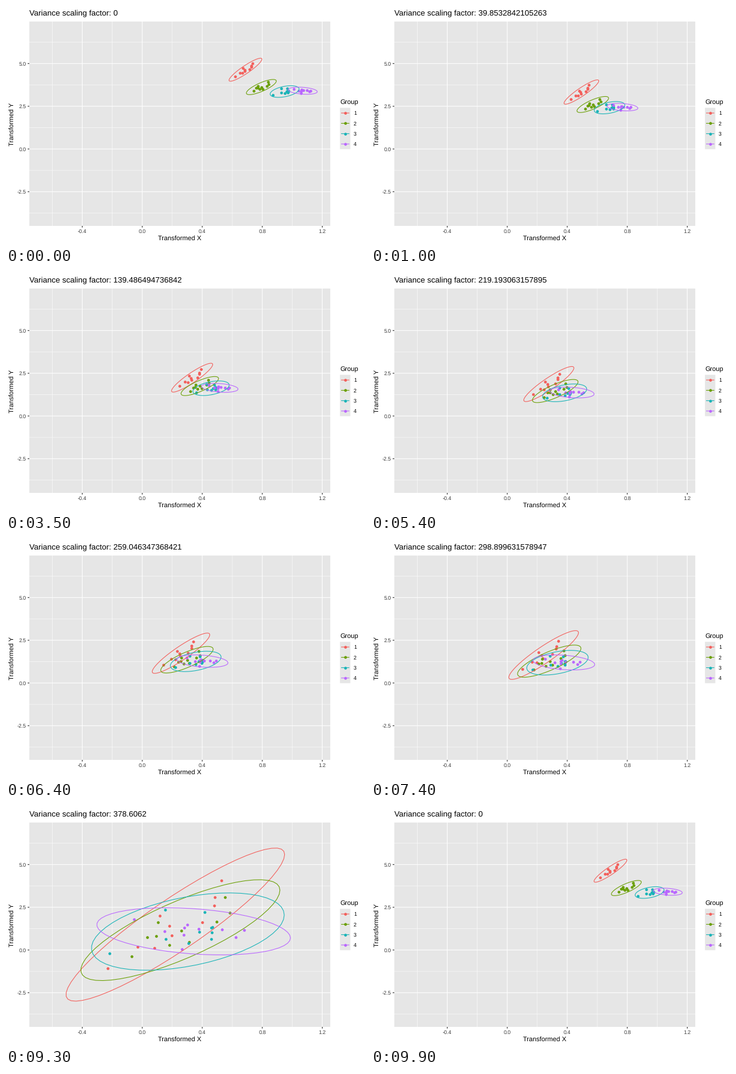
Recreate the animation shown at these times as a matplotlib script. Size 600x400 px, loop 10 s.

```python
import numpy as np
import matplotlib.pyplot as plt
from matplotlib.animation import FuncAnimation
from matplotlib.patches import Rectangle

plt.rcParams["font.family"] = "Liberation Sans"
plt.rcParams["text.hinting"] = "none"
plt.rcParams["path.snap"] = False

PX = 0.72  # points per pixel at 100 dpi
W, H, FRAMES = 600, 400, 100
LEFT, RIGHT, TOP, BOTTOM = 39, 542, 26, 368
ORIGIN = np.array([227.7, 239.3])
X_UNIT, Y_UNIT = 250.7, 28.6
COLORS = ["#F35E5A", "#6A9F04", "#17B3B7", "#B966FF"]
PANEL, LABEL, TICK = "#E6E6E6", "#3C3C3C", "#262626"

STATES = 20
STEP = 378.6062 / 19
LIMIT = 384.55
REF = 17 * STEP  # factor at which the clouds below are given

CLOUDS = [
    [(236, 227), (258, 211), (270, 212), (274, 188.5), (281, 196),
     (282.5, 203), (305, 193.5), (313.5, 181), (314, 175), (319, 163)],
    [(258.5, 224), (270, 210), (276.5, 209), (278, 199), (286, 215.5),
     (295, 205), (300.5, 213.5), (320.5, 198.5), (326.5, 180.5), (330, 192)],
    [(250, 223), (290.5, 191.5), (291, 212.5), (307.5, 215.5), (315.5, 207.5),
     (319.5, 193), (324, 212.5), (325, 204), (324.5, 208), (324, 204.5)],
    [(274, 198), (296, 206.5), (308.5, 220), (310, 209.5), (312.5, 202),
     (310.5, 204), (321, 205), (338, 205.5), (348, 211), (354, 206)],
]


def shrink(s):
    """Pull of the group centres towards the origin."""
    return 1 / np.sqrt(1 + 0.02353 * s)


def spread(s):
    """Growth of each cloud around its centre."""
    return 1 / np.sqrt(1 - s / LIMIT)


def ellipse(dev):
    """95% t-ellipse around centred points."""
    a = np.arange(52) * 2 * np.pi / 51
    chol = np.linalg.cholesky(np.cov(dev.T))
    return 2.918 * np.column_stack([np.cos(a), np.sin(a)]) @ chol.T


groups = []
for cloud in np.array(CLOUDS):
    mean = cloud.mean(axis=0)
    dev = (cloud - mean) / spread(REF)
    groups.append(((mean - ORIGIN) / shrink(REF), dev, ellipse(dev)))


def pose(state):
    """Points and outline of every group at one state."""
    s = state * STEP
    out = []
    for home, dev, ring in groups:
        c = ORIGIN + shrink(s) * home
        out.append((c + spread(s) * dev, c + spread(s) * ring))
    return out


POSES = [pose(k) for k in range(STATES)]


def arrival(k):
    return 5 * k if k <= 10 else 5 * k - 1


def phase(n):
    """Current state, next state and progress between them."""
    k = max(j for j in range(STATES + 1) if arrival(j) <= n)
    if k == STATES:
        return 0, 0, 0.0
    steps = 4 if k == 0 else 3
    t = max(0, n - arrival(k + 1) + steps) / steps
    return k, (k + 1) % STATES, t


fig = plt.figure(figsize=(6, 4), dpi=100, facecolor="white")
ax = fig.add_axes([0, 0, 1, 1])
ax.set_xlim(0, W)
ax.set_ylim(H, 0)
ax.axis("off")


def box(x0, y0, x1, y1):
    ax.add_patch(Rectangle((x0, y0), x1 - x0, y1 - y0, fc=PANEL, lw=0, zorder=0))


def line(xs, ys, color, width, z):
    return ax.plot(xs, ys, color=color, lw=width * PX, zorder=z,
                   solid_capstyle="butt", solid_joinstyle="round")[0]


def text(x, y, s, size, color="black", **kw):
    return ax.text(x, y, s, fontsize=size * PX, color=color, zorder=6, **kw)


def dots(pts, color):
    return ax.plot(pts[:, 0], pts[:, 1], "o", ms=4.7 * PX, color=color,
                   mew=0, zorder=3)[0]


# Panel, grid and axes
box(LEFT, TOP, RIGHT, BOTTOM)
for v in np.arange(-0.6, 1.3, 0.2):
    x = ORIGIN[0] + v * X_UNIT
    major = round(v * 10) % 4 == 0
    line([x, x], [TOP, BOTTOM], "white", 1.07 if major else 0.53, 1 + major)
    if major:
        line([x, x], [BOTTOM, BOTTOM + 2.75], TICK, 1.07, 2)
        text(x, 379.8, f"{v + 0.0:.1f}".replace("-0.0", "0.0"), 8.8, LABEL,
             ha="center", va="baseline")
for v in np.arange(-3.75, 6.5, 1.25):
    y = ORIGIN[1] - v * Y_UNIT
    major = v % 2.5 == 0
    line([LEFT, RIGHT], [y, y], "white", 1.07 if major else 0.53, 1 + major)
    if major:
        line([LEFT - 2.75, LEFT], [y, y], TICK, 1.07, 2)
        text(34, y + 3.2, f"{v:.1f}", 8.8, LABEL, ha="right", va="baseline")

text((LEFT + RIGHT) / 2, 393, "Transformed X", 11, ha="center", va="baseline")
text(13.4, (TOP + BOTTOM) / 2 + 0.5, "Transformed Y", 11, rotation=90,
     ha="right", va="center", rotation_mode="default").set(
         ha="center", va="baseline", rotation_mode="anchor")
title = text(LEFT, 16, "", 13.2, va="baseline")

# Legend
text(558.2, 164, "Group", 11, va="baseline")
box(558.2, 170.4, 575.5, 239.6)
for i, color in enumerate(COLORS):
    y = 179.1 + 17.28 * i
    line([560, 573.8], [y, y], color, 1.07, 2)
    dots(np.array([[566.9, y]]), color)
    text(581, y + 3.2, str(i + 1), 8.8, va="baseline")

clouds = [dots(np.zeros((1, 2)), c) for c in COLORS]
rings = [line([], [], c, 1.07, 4) for c in COLORS]


def draw(n):
    a, b, t = phase(n)
    title.set_text(f"Variance scaling factor: {(b if t >= 0.5 else a) * STEP:.15g}")
    for i, (p, q) in enumerate(zip(POSES[a], POSES[b])):
        clouds[i].set_data(*((1 - t) * p[0] + t * q[0]).T)
        rings[i].set_data(*((1 - t) * p[1] + t * q[1]).T)
    return [title, *clouds, *rings]


anim = FuncAnimation(fig, draw, frames=FRAMES, interval=100, repeat=True,
                     repeat_delay=0, blit=False)
plt.show()
```
